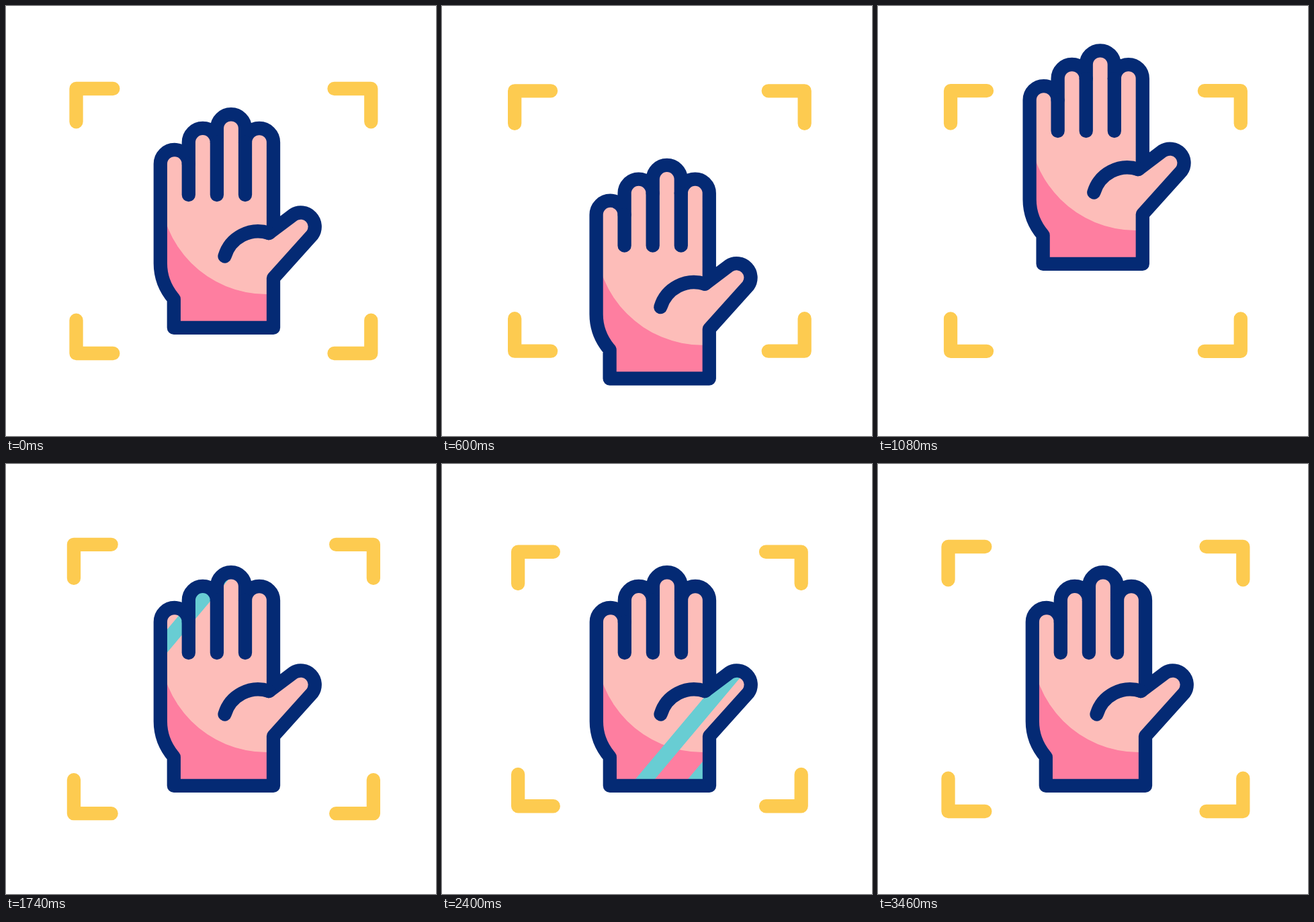
These frames come from a looping animation (640x640 px, 3600 ms). An HTML page:

```html
<!DOCTYPE html>
<html lang="en">
<head>
<meta charset="utf-8">
<title>Palm scan</title>
<style>
  html, body { margin: 0; width: 100%; height: 100%; overflow: hidden; background: #fff; }
  svg { display: block; width: 100vw; height: 100vh; }
  .line { fill: none; stroke-width: 20.3; stroke-linecap: round; stroke-linejoin: round; }
</style>
</head>
<body>
<svg viewBox="0 0 640 640">
  <defs>
    <path id="shape" d="M229.8 383V235a21 21 0 0 1 42 0V203a21 21 0 0 1 42.1 0V182.3a21 21 0 0 1 42.1 0V203a21 21 0 0 1 42 0V331L391.5 338L427.5 310.8A21 21 0 0 1 456 340.5L398 405V478.8H249.8V436C237 421 229.8 403 229.8 383Z"/>
    <clipPath id="inside"><use href="#shape"/></clipPath>
  </defs>
  <path id="brackets" class="line" stroke="#fdcb50"/>
  <g id="hand">
    <use href="#shape" fill="#fdbdb9"/>
    <g clip-path="url(#inside)">
      <path d="M229 270A159 159 0 0 0 388 429H410V490H229Z" fill="#fe7ea0"/>
      <path id="stripes" fill="#68cdd3"/>
    </g>
    <g class="line" stroke="#042a74">
      <use href="#shape"/>
      <path d="M271.8 235V281M313.9 203V281M356 203V281M325.5 372.5A52 52 0 0 1 391.5 338"/>
    </g>
  </g>
</svg>
<script>
const LOOP = 3600;
const el = id => document.getElementById(id);
const smooth = s => s * s * (3 - 2 * s);
const clamp = s => Math.min(1, Math.max(0, s));

// Keys are [time, value] pairs joined by smooth easing.
function track(keys, t) {
  if (t <= keys[0][0]) return keys[0][1];
  for (let i = 1; i < keys.length; i++) {
    const [t0, a] = keys[i - 1], [t1, b] = keys[i];
    if (t < t1) return a + (b - a) * smooth((t - t0) / (t1 - t0));
  }
  return keys[keys.length - 1][1];
}

// Cubic Bezier easing with flat ends.
function ease(x, x1, x2) {
  let lo = 0, hi = 1;
  for (let i = 0; i < 24; i++) {
    const s = (lo + hi) / 2, r = 1 - s;
    if (3 * r * r * s * x1 + 3 * r * s * s * x2 + s * s * s < x) lo = s;
    else hi = s;
  }
  return smooth(lo);
}

const handX = [[547, 0], [973, -5], [1400, 0]];
const handY = [[120, 0], [547, 84.4], [973, -113], [1400, 0]];
const zoom = [
  [120, 1], [367, 1.262], [761, 0.826], [1155, 1],
  [1684, 1], [2060, 1.262], [2600, 0.827], [3140, 1]
];

function bracketPath(k) {
  let d = "";
  for (const sx of [-1, 1]) for (const sy of [-1, 1]) {
    const at = (x, y) => (323.9 + sx * x * k).toFixed(2) + " " + (320 + sy * y * k).toFixed(2);
    d += `M${at(164.6, 197)}L${at(219.4, 197)}L${at(219.4, 147.7)}`;
  }
  return d;
}

function stripe(y) {
  const slope = 1.19, left = y + 20 * slope, right = y - 260 * slope;
  return `M220 ${left}L500 ${right}v34.5L220 ${left + 34.5}Z`;
}

function draw(t) {
  el("hand").setAttribute("transform", `translate(${track(handX, t)} ${track(handY, t)})`);
  el("brackets").setAttribute("d", bracketPath(track(zoom, t)));
  const y = 198 + 544 * ease(clamp((t - 1540) / 1520), 0.25, 0.42);
  const scanning = t > 1540 && t < 3060;
  el("stripes").setAttribute("d", scanning ? stripe(y) + stripe(y - 93) : "");
}

const start = performance.now();
function tick() {
  draw((performance.now() - start) % LOOP);
  requestAnimationFrame(tick);
}
draw(0);
requestAnimationFrame(tick);
</script>
</body>
</html>
```
